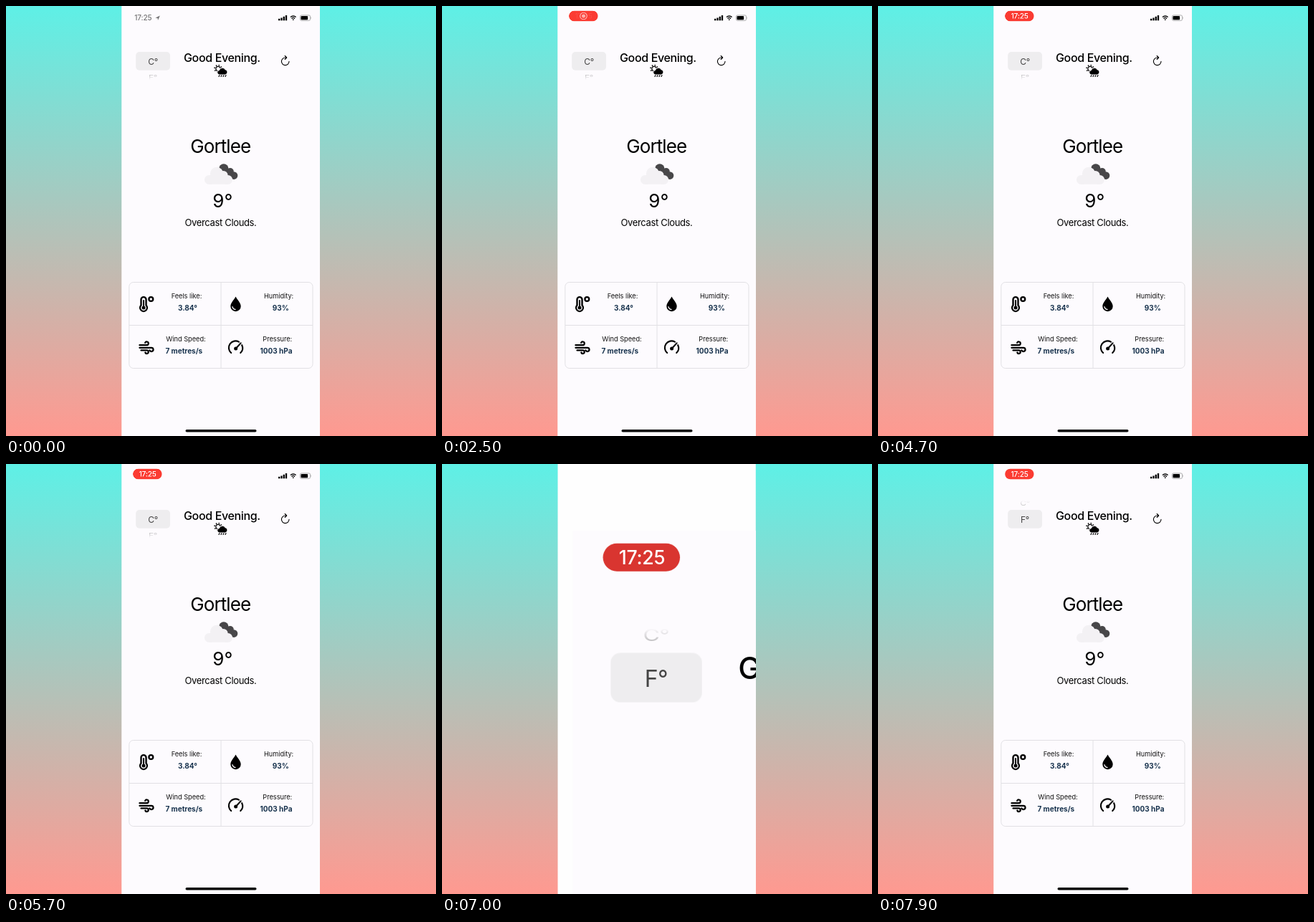
Recreate the animation shown at these times as an HTML page. Size 600 by 600 pixels, loop 8 s.

```html
<!DOCTYPE html>
<html lang="en">
<head>
<meta charset="utf-8">
<title>Weather app</title>
<style>
html, body { margin: 0; width: 100%; height: 100%; overflow: hidden; }
body { background: linear-gradient(#5ef0e6, #ff9990); }
svg { display: block; width: 100vw; height: 100vh; }
text { font-family: Inter, "Liberation Sans", sans-serif; text-anchor: middle; }

.zoom, .clock, .pill, .glow, .rec, .time, .row { animation: 8s linear infinite; }

.zoom { transform-origin: 0 0; animation-name: zoom; }
@keyframes zoom {
  0%, 71.9% { transform: translate(0, 0) scale(1); animation-timing-function: ease-in-out; }
  78.1%, 91.3% { transform: translate(-248px, 93px) scale(2.667); animation-timing-function: ease-in-out; }
  97.5%, 100% { transform: translate(0, 0) scale(1); }
}

/* status bar: clock, then recording pill */
.clock { animation-name: clock; }
@keyframes clock { 0% { opacity: .55; } 3%, 100% { opacity: 0; } }
.pill { animation-name: pill; }
@keyframes pill { 0%, 2% { opacity: 0; } 5%, 100% { opacity: 1; } }
.glow { animation-name: glow; }
@keyframes glow {
  0%, 10%, 22%, 34%, 46%, 58%, 69.5%, 80%, 94%, 100% { fill: #fb3b32; animation-timing-function: ease-in-out; }
  16.25%, 40%, 63.75%, 87.5% { fill: #d93530; animation-timing-function: ease-in-out; }
}
.rec { animation-name: rec; }
@keyframes rec { 0%, 30% { opacity: 1; } 33%, 100% { opacity: 0; } }
.time { animation-name: time; }
@keyframes time { 0%, 31% { opacity: 0; } 34%, 100% { opacity: 1; } }

/* unit picker: rows roll on a cylinder */
.row { transform-origin: 0 0; }
.c { animation-name: roll-c; }
.f { animation-name: roll-f; }
@keyframes roll-c {
  0%, 75% { transform: translate(205px, 77.3px) scaleY(1); animation-timing-function: ease-in; }
  78.75% { transform: translate(205px, 64.4px) scaleY(.89); animation-timing-function: ease-out; }
  83.2%, 100% { transform: translate(205px, 54.8px) scaleY(.72); }
}
@keyframes roll-f {
  0%, 75% { transform: translate(205px, 99.8px) scaleY(.72); animation-timing-function: ease-in; }
  78.75% { transform: translate(205px, 89.1px) scaleY(.92); animation-timing-function: ease-out; }
  83.2%, 100% { transform: translate(205px, 77.3px) scaleY(1); }
}

.row text { font-size: 12px; letter-spacing: -.3px; fill: #444; }
.hello { font-size: 16px; font-weight: 500; letter-spacing: -.35px; }
.city { font-size: 26px; letter-spacing: -.9px; }
.temp { font-size: 26px; }
.sky { font-size: 13px; letter-spacing: -.35px; }
.label { font-size: 9.2px; fill: #111; }
.value { font-size: 10px; font-weight: 700; fill: #17324d; }
.status { font-size: 10px; font-weight: 500; letter-spacing: -.1px; }
.line { fill: none; stroke: #000; stroke-linecap: round; stroke-linejoin: round; }
</style>
</head>
<body>
<svg viewBox="0 0 600 600">
  <defs>
    <clipPath id="screen"><rect x="161.5" width="276.3" height="600"/></clipPath>
    <linearGradient id="fade" gradientUnits="userSpaceOnUse" x1="0" y1="51" x2="0" y2="103">
      <stop offset="0" stop-color="#fff" stop-opacity="0"/>
      <stop offset=".25" stop-color="#fff" stop-opacity=".6"/>
      <stop offset=".25" stop-color="#fff"/>
      <stop offset=".75" stop-color="#fff"/>
      <stop offset=".75" stop-color="#fff" stop-opacity=".6"/>
      <stop offset="1" stop-color="#fff" stop-opacity="0"/>
    </linearGradient>
    <mask id="wheel" maskUnits="userSpaceOnUse" x="180" y="51" width="50" height="52" style="mask-type:alpha">
      <rect x="180" y="51" width="50" height="52" fill="url(#fade)"/>
    </mask>
  </defs>

  <g clip-path="url(#screen)">
    <rect x="161" width="277" height="600" fill="#fefefe"/>
    <g class="zoom">
      <rect x="161.5" width="276.5" height="600" fill="#fdfbfe"/>

      <g class="clock">
        <text class="status" x="191.4" y="20.4">17:25</text>
        <path d="M214.8 13.5L208.4 16.5l3.2.4.4 3.2z"/>
      </g>
      <g class="pill">
        <rect class="glow" x="177.2" y="6.7" width="40.3" height="14.6" rx="7.3"/>
        <g class="rec">
          <circle cx="197.5" cy="14" r="4.7" fill="none" stroke="#fff" stroke-width="1.1"/>
          <circle cx="197.5" cy="14" r="2.5" fill="#fff"/>
        </g>
        <text class="status time" x="197.6" y="17.6" fill="#fff">17:25</text>
      </g>

      <!-- signal, wifi, battery -->
      <path d="M381.2 20.3v-2.5M384.5 20.3v-3.9M387.8 20.3v-5.5M391 20.3v-7.3" stroke="#000" stroke-width="2.3"/>
      <path class="line" style="stroke-linecap:butt" stroke-width="1.4" d="M397 15.6a5.4 5.4 0 0 1 7.6 0M398.5 17.5a3.3 3.3 0 0 1 4.6 0"/>
      <path d="M400.8 20.2l-1.3-1.4a1.9 1.9 0 0 1 2.6 0z"/>
      <rect x="410.4" y="12.9" width="14.2" height="7.4" rx="2" fill="none" stroke="#999" stroke-width=".8"/>
      <rect x="411.5" y="14" width="9.6" height="5.2" rx="1"/>
      <path d="M425.5 15.2q1.3 1.4 0 2.8z" fill="#888"/>

      <rect x="181.2" y="64" width="47.8" height="25.8" rx="5" fill="#eeedef"/>
      <g mask="url(#wheel)">
        <g class="row c"><text y="4.3">C°</text></g>
        <g class="row f"><text y="4.3">F°</text></g>
      </g>

      <text class="hello" x="301.4" y="77.7">Good Evening.</text>

      <!-- sun, cloud, rain -->
      <g class="line">
        <circle cx="296" cy="87.4" r="3.1" stroke-width="1.2"/>
        <circle cx="296" cy="87.4" r="4.9" stroke-width="1.7" stroke-dasharray="1.4 2.45" style="stroke-linecap:butt"/>
        <path d="M298 96.5l-1 1.9M301 96.5l-1 1.9M304 96.5l-1 1.9M307 96.5l-1 1.9" stroke-width="1.2"/>
      </g>
      <path d="M297.4 95.4a2.8 2.8 0 0 1 .3-5.5a4.4 4.4 0 0 1 8-.9a3.3 3.3 0 0 1 .5 6.4z" stroke="#fdfbfe" stroke-width="1.6" paint-order="stroke"/>

      <path class="line" d="M395 77.3A5.3 5.3 0 1 1 389.7 72H391.3M389.2 69.5L391.7 72l-2.5 2.5" stroke-width="1.1"/>

      <text class="city" x="299.2" y="205.2">Gortlee</text>
      <g fill="#484749">
        <circle cx="303.8" cy="227" r="6.7"/>
        <circle cx="312.8" cy="231" r="5"/>
        <circle cx="318" cy="236.6" r="5.3"/>
        <path d="M303 231l9-1 5 7-7 3z"/>
      </g>
      <g fill="#f3f1f4">
        <circle cx="283.4" cy="242.4" r="6.4"/>
        <circle cx="294" cy="234" r="9.2"/>
        <circle cx="303.2" cy="236.4" r="6.4"/>
        <circle cx="309.6" cy="242.4" r="6.4"/>
        <rect x="283" y="236" width="27" height="12.8"/>
      </g>
      <text class="temp" x="302.3" y="280.6">9°</text>
      <text class="sky" x="299.5" y="306.8">Overcast Clouds.</text>

      <g fill="none" stroke="#e1e0e4">
        <rect x="171.8" y="385.5" width="256.2" height="120" rx="6"/>
        <path d="M300 385.5v120M172 445.5h256"/>
      </g>

      <!-- thermometer -->
      <g class="line" stroke-width="2.4">
        <path d="M188.5 417.6V409.6a3.5 3.5 0 0 1 7 0v8a4.9 4.9 0 1 1-7 0z"/>
        <path d="M192 411v9.5" stroke-width="2"/>
        <circle cx="202.3" cy="409" r="2.9"/>
      </g>
      <circle cx="192" cy="421" r="2.5"/>
      <text class="label" x="252" y="408.2">Feels like:</text>
      <text class="value" x="253.4" y="425.2">3.84°</text>

      <!-- drop -->
      <path d="M320.5 405.4c2 4 7.2 9 7.2 13.6a7.2 7.2 0 0 1-14.4 0c0-4.6 5.2-9.6 7.2-13.6z"/>
      <path d="M316 419.6a4.6 4.6 0 0 0 4 3.8" fill="none" stroke="#fdfbfe" stroke-width="1.3" stroke-linecap="round"/>
      <text class="label" x="380.6" y="408.2">Humidity:</text>
      <text class="value" x="383.3" y="425.2">93%</text>

      <!-- wind -->
      <path class="line" stroke-width="2.2" d="M186.4 473.2h10a2.4 2.4 0 1 0-2.3-3.2M186.4 476.8h16.6a2.6 2.6 0 1 1-2.5 3.5M188.5 480.4h8a2.3 2.3 0 1 1-2.2 3.1"/>
      <text class="label" x="251" y="468.2">Wind Speed:</text>
      <text class="value" x="248.3" y="485.2">7 metres/s</text>

      <!-- gauge -->
      <path class="line" stroke-width="2.1" d="M314.2 484A9.4 9.4 0 0 1 325 468.7M329.2 473.2A9.4 9.4 0 0 1 327.2 484M320.7 478L327.6 470.4"/>
      <circle cx="320.6" cy="478" r="2.5"/>
      <text class="label" x="378.8" y="468.2">Pressure:</text>
      <text class="value" x="377" y="485.2">1003 hPa</text>

      <rect x="250.5" y="591" width="99" height="3.5" rx="1.75"/>
    </g>
  </g>
</svg>
</body>
</html>
```
